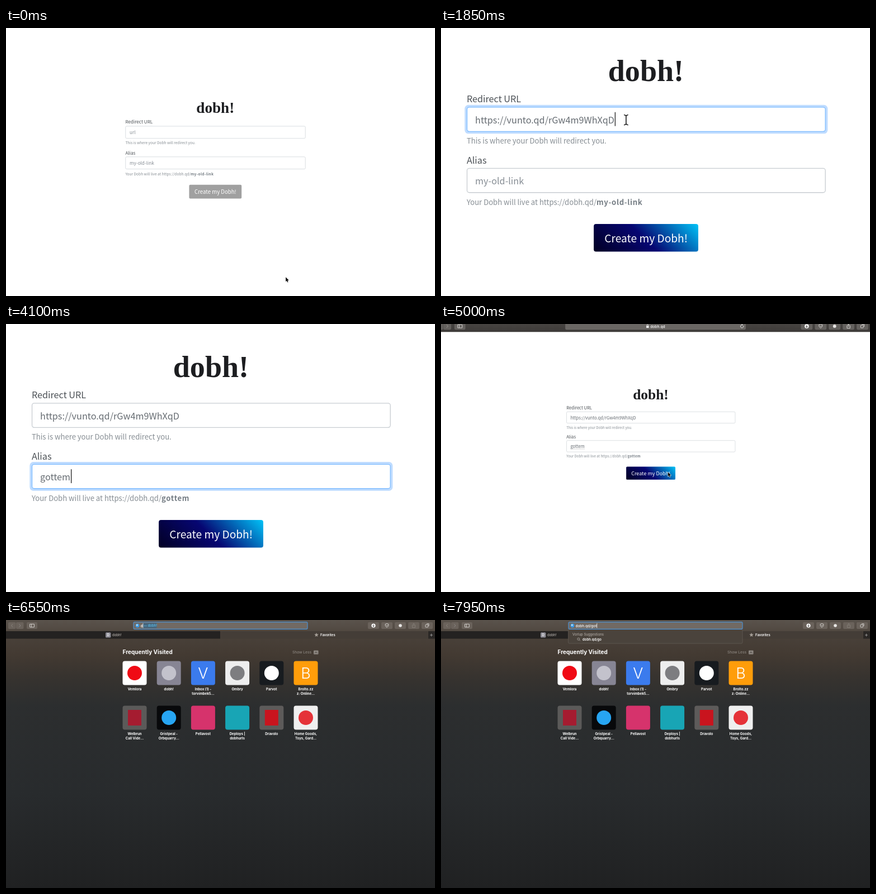
An HTML page with a canvas for the animation above (8000 ms loop, 767x480 px).

```html
<!DOCTYPE html>
<html lang="en">
<meta charset="utf-8">
<style>
  html, body { margin: 0; width: 100%; height: 100%; overflow: hidden; background: #fff; }
  canvas { display: block; }
</style>
<canvas id="stage" width="767" height="480"></canvas>
<script>
const ctx = document.getElementById('stage').getContext('2d');
const LOOP = 8000;
const PAGE = '"Noto Sans CJK JP", "Noto Sans CJK SC", "Noto Sans", sans-serif';
const UI = 'Inter, Roboto, sans-serif';
const SERIF = '"Liberation Serif", serif';
const LINK = 'https://vunto.qd/rGw4m9WhXqD', ALIAS = 'gottem', SITE = 'dobh.qd';

// [time, values...]
const CAMERA = [[1000, 1.107, -41.2, 1.3], [1550, 2.206, -461.5, -206], [4400, 2.206, -461.5, -206], [5150, 1, 0, 0]];
const POINTER = [[50, 489, 402], [850, 359.2, 168], [1900, 359.2, 168], [2450, 366.4, 223.5],
  [4400, 366.4, 223.5], [5000, 405, 262], [5300, 405, 262], [5800, 422, 272]];

const ease = p => p < .5 ? 4 * p ** 3 : 1 - (2 - 2 * p) ** 3 / 2;
const typed = (s, t, start, step) => s.slice(0, Math.max(0, Math.floor((t - start) / step) + 1));

function track(keys, t) {
  const i = keys.findIndex(k => k[0] > t);
  if (i === 0) return keys[0].slice(1);
  if (i < 0) return keys.at(-1).slice(1);
  const a = keys[i - 1], b = keys[i], p = ease((t - a[0]) / (b[0] - a[0]));
  return a.slice(1).map((v, n) => v + (b[n + 1] - v) * p);
}

function box(x, y, w, h, r, fill, stroke, width = .6) {
  ctx.beginPath();
  ctx.roundRect(x, y, w, h, r);
  if (fill) { ctx.fillStyle = fill; ctx.fill(); }
  if (stroke) { ctx.strokeStyle = stroke; ctx.lineWidth = width; ctx.stroke(); }
}

function dot(x, y, r, fill, stroke) {
  box(x - r, y - r, 2 * r, 2 * r, r, fill, stroke, .8);
}

function line(color, width, ...points) {
  ctx.beginPath();
  for (const [x, y] of points) ctx.lineTo(x, y);
  ctx.strokeStyle = color;
  ctx.lineWidth = width;
  ctx.stroke();
}

function star(x, y, r, n, inner, fill) {
  ctx.beginPath();
  for (let i = 0; i < 2 * n; i++) {
    const a = i * Math.PI / n - Math.PI / 2, d = i % 2 ? r * inner : r;
    ctx.lineTo(x + d * Math.cos(a), y + d * Math.sin(a));
  }
  ctx.fillStyle = fill;
  ctx.fill();
}

function fade(x0, y0, x1, y1, stops) {
  const g = ctx.createLinearGradient(x0, y0, x1, y1);
  for (const [at, color] of stops) g.addColorStop(at, color);
  return g;
}

// Draws text and returns its width.
function text(s, x, y, size, color, align = 'left', weight = 300, family = PAGE) {
  ctx.font = `${weight} ${size}px ${family}`;
  ctx.textAlign = align;
  ctx.fillStyle = color;
  ctx.fillText(s, x, y);
  return ctx.measureText(s).width;
}

// Interface text, centred vertically on y.
const ui = (s, x, y, color = '#fff', weight = 500, size = 6, align = 'left') =>
  text(s, x, y + size * .36, size, color, align, weight, UI);

function field(y, value, placeholder, focused) {
  if (focused) box(228.4, y - 1.6, 294.2, 23.4, 3, '#bfdcff');
  box(230.3, y + .3, 290.4, 19.7, 1.8, '#fff', focused ? '#80bdff' : '#c8cdd2');
  const w = text(value || placeholder, 236.9, y + 13.3, 7.35, value ? '#666c72' : '#868d94');
  if (focused) {
    const x = 237.2 + (value ? w + .4 : 0);
    line('#222', .6, [x, y + 4.3], [x, y + 15.6]);
  }
  return w;
}

function form(t) {
  const url = t >= 1500 ? LINK : '', alias = typed(ALIAS, t, 3000, 150);
  const focus = t < 1000 || t >= 5000 ? 0 : t < 2500 ? 1 : 2;
  text('dobh!', 375.3, 136.5, 24.5, '#1c1d20', 'center', 700, SERIF);
  text('Redirect URL', 230, 153.7, 7.35, '#4b5055');
  field(157.4, url, 'url', focus === 1);
  text('This is where your Dobh will redirect you.', 230, 187.1, 5.95, '#868d93');
  text('Alias', 230, 203.5, 7.35, '#4b5055');
  const w = field(207, alias, 'my-old-link', focus === 2);
  if (t >= 5000) {
    ctx.setLineDash([.8, .8]);
    line('#999', .7, [237, 222], [237 + w, 222]);
    ctx.setLineDash([]);
  }
  const lead = text(`Your Dobh will live at https://${SITE}/`, 230, 236.9, 5.95, '#868d93');
  ctx.letterSpacing = '.3px';
  text(alias || 'my-old-link', 230 + lead, 236.9, 5.95, '#757d84', 'left', 700);
  ctx.letterSpacing = '0px';
  box(333, 252.5, 84.7, 22.4, 1.8, url
    ? fade(348.7, 290.3, 402.3, 236.7, [[0, '#020024'], [.48, '#060672'], [1, '#00c4f8']])
    : '#a0a0a0');
  text('Create my Dobh!', 375.4, 267.5, 8.7, '#fff', 'center');
}

function alertBox() {
  box(230, 292, 291, 39.5, 2, '#cde9d4');
  text('Successfully created URL!', 363.5, 308.7, 9.1, '#4c5f53', 'center');
  const w = text(`http://${SITE}/${ALIAS}`, 363.5, 321, 7.4, '#1b7dff', 'center');
  for (const side of [-1, 1]) {
    const x = 363.5 + side * (w / 2 + 5);
    star(x, 318.5, 3.2, 4, .3, '#f3b63f');
    star(x - 2.7, 316, 1.4, 4, .3, '#f3b63f');
  }
  line('#5f7567', .8, [503.7, 302.7], [508.3, 307.3]);
  line('#5f7567', .8, [508.3, 302.7], [503.7, 307.3]);
}

function toolbar(right, button, dim) {
  const ink = '#e8e6e4', arrow = dim ? '#8a837d' : ink;
  box(4, 4, 13.5, 12, 2, button);
  box(18, 4, 13.5, 12, 2, button);
  line(arrow, 1, [12, 7.3], [9.5, 10], [12, 12.7]);
  line('#8a8683', 1, [23.5, 7.3], [26, 10], [23.5, 12.7]);
  box(37, 4, 19, 12, 2, button);
  box(42.5, 7.3, 8, 5.6, .5, null, ink, .8);
  line(ink, .8, [45.3, 7.3], [45.3, 12.9]);
  for (let i = 0; i < 5; i++) box(right - 10 + 24 * i, 4, 20, 12, 2, button);
  dot(right, 10, 3.6, '#fff');
  line('#4a4744', 1, [right, 8], [right, 12]);
  line('#4a4744', 1, [right - 1.6, 10.4], [right, 12], [right + 1.6, 10.4]);
  const s = right + 24;
  line(ink, .8, [s, 6.4], [s + 3, 7.5], [s + 2.6, 10.8], [s, 13.4], [s - 2.6, 10.8], [s - 3, 7.5], [s, 6.4]);
  line(ink, .8, [s - 1.2, 9.7], [s, 10.8], [s + 1.4, 9]);
  dot(s + 24, 10, 2.8, ink);
  const u = s + 48, share = dim ? '#8a837d' : ink;
  line(share, .8, [u - 1.4, 9], [u - 2.6, 9], [u - 2.6, 13.5], [u + 2.6, 13.5], [u + 2.6, 9], [u + 1.4, 9]);
  line(share, .8, [u, 11], [u, 6.3]);
  line(share, .8, [u - 1.5, 7.7], [u, 6.2], [u + 1.5, 7.7]);
  box(s + 69, 8.3, 4.6, 4.6, .6, null, ink, .8);
  line(ink, .8, [s + 71, 6.7], [s + 75, 6.7], [s + 75, 11]);
}

function plus(x, y, color) {
  line(color, .8, [x - 2.5, y], [x + 2.5, y]);
  line(color, .8, [x, y - 2.5], [x, y + 2.5]);
}

function lightChrome() {
  box(0, 0, 767, 20, 0, fade(0, 0, 0, 20, [[0, '#4b4845'], [1, '#3d3a38']]));
  toolbar(644, '#64615e', false);
  box(228, 4, 311, 12, 2, '#6a6764');
  box(367.6, 9.4, 4.4, 3.6, .6, '#eee');
  box(368.5, 7.2, 2.6, 4, 1.3, null, '#eee', .8);
  ui(SITE, 374.5, 10.2, '#fff', 500, 6.4);
  ctx.beginPath();
  ctx.arc(532.5, 10.2, 2.7, -.4, 5);
  ctx.strokeStyle = '#eee';
  ctx.lineWidth = .8;
  ctx.stroke();
  line('#eee', .8, [532, 6.2], [533.6, 7.6], [532, 9]);
  box(754, 8, 13, 12, 0, '#2b2927');
  plus(760.5, 14, '#aaa');
}

// label lines, tile colour, mark shape, mark colour or letter
const TILES = [
  [['Vemlora'], '#fff', 'circle', '#f00a14'],
  [['dobh!'], '#878594', 'circle', '#c3c2cc'],
  [['Inbox (1) -', 'torvimbek5...'], '#3b7bed', 'letter', 'V'],
  [['Ombry'], '#eeeeee', 'circle', '#7d7d80'],
  [['Parvot'], '#171b1f', 'circle', '#fff'],
  [['Brolto.zz', 'z: Online...'], '#ff9d0a', 'letter', 'B'],
  [['Welbrun', 'Call Vide...'], '#5b5a59', 'square', '#a51c30'],
  [['Gristpeal -', 'Orbquarry...'], '#08090b', 'circle', '#27a5f2'],
  [['Pellavost'], '#d6336c'],
  [['Deploys |', 'dobhurls'], '#18a5b5'],
  [['Dravolo'], '#5d5b5a', 'square', '#c9141e'],
  [['Home Goods,', 'Toys, Gard...'], '#efefef', 'circle', '#e53238'],
];
const tileAt = i => [230 + 61.2 * (i % 6), i < 6 ? 95 : 175];

function favorites() {
  box(0, 0, 767, 480, 0, fade(0, 0, 0, 480,
    [[0, '#574f48'], [.05, '#4a423b'], [.13, '#433a32'], [.21, '#37332f'], [.32, '#2c2e2f'], [.65, '#282b2d'], [1, '#202122']]));
  ui('Frequently Visited', 208.5, 57.3, '#fff', 700, 10);
  ui('Show Less', 546, 58, '#8b857f', 500, 6.6, 'right');
  box(550, 54.5, 8.5, 7, 1, '#8b857f');
  line('#3d3731', 1, [552.3, 59.2], [554.2, 57], [556.2, 59.2]);
  TILES.forEach(([label, color, shape, mark], i) => {
    const [x, y] = tileAt(i);
    box(x - 21.5, y - 21.5, 43, 43, 4, color);
    if (shape === 'circle') dot(x, y, 13, mark);
    if (shape === 'square') box(x - 12, y - 14, 24, 28, 0, mark);
    if (shape === 'letter') ui(mark, x, y + .5, '#fff', 300, 27, 'center');
    label.forEach((s, n) => ui(s, x, y + 29 + 8 * n, '#fff', 700, 6.1, 'center'));
  });
}

function darkChrome() {
  box(0, 0, 767, 20, 0, fade(0, 0, 0, 20, [[0, '#5a534c'], [1, '#514941']]));
  toolbar(657, '#6a625b', true);
  box(0, 20, 383, 13.5, 0, '#242221');
  box(383.5, 20, 371, 13.5, 0, '#443d37');
  box(755, 20, 12, 13.5, 0, '#2a2725');
  plus(760.5, 27, '#aaa');
  box(178, 22.2, 9.4, 9.4, 1.6, '#8d8c95');
  ui('D', 182.7, 27, '#fff', 600, 6, 'center');
  ui('dobh!', 190, 27, '#b5b0ab');
  star(555, 26.8, 4, 5, .45, '#a49d96');
  ui('Favorites', 562, 27, '#fff', 600);
}

function globe(x, y) {
  dot(x, y, 3.4, '#3d9be6');
  box(x - 2, y - 2.2, 2.6, 2.8, 1, '#cfe9f5');
}

function lens(y) {
  dot(245.8, y - .6, 2, null, '#b5b0ab');
  line('#b5b0ab', .8, [247.3, y + .9], [249, y + 2.6]);
}

function hit(name, address, y, color = '#c5c0bb') {
  globe(247, y);
  const w = ui(name, 253, y, '#fff', 600);
  ui(` — ${address}`, 253 + w, y, color);
}

const panelTitle = (s, y) => ui(s, 235, y, '#aca6a0');
const rule = y => line('#7b756f', .6, [228, y], [539, y]);

const SUGGESTIONS = ['dobh.q', 'dobh.gif', 'dobh goose', 'bold gong', 'dobh goose meme', 'dobh game'];
const HISTORY = [
  ["drobbling-web | Drobbling's web dashboard and competition...", SITE + '/.paxolit/functions/serv...'],
  ['Vorlup', SITE + '/qpwofj[hsk;re'],
  ['TarnBoxes - Vemlora', SITE + '/tarnix'],
  ['Tezzik | Welcome to your new app!', SITE + '/mwopqez'],
  [`${SITE}/README.md at master · tarnix/${SITE}`, `parvot.zzz/tarnix/${SITE}/bl...`],
  ['Cannot Open Page', 'dobh.qx'],
  ['Tob Varnley - Seven Paper Boats Adrift (Video) - Vemlora', SITE + '/hum'],
];

function fullPanel() {
  ctx.save();
  box(227.5, 17, 311.5, 232, 2, fade(0, 17, 0, 249, [[0, '#4d463f'], [.4, '#413c37'], [1, '#343534']]), '#68625c', .6);
  ctx.clip();
  ctx.globalAlpha = .38;
  for (const [i, color] of [[2, '#3b7bed'], [5, '#ff9d0a'], [8, '#b03048'], [9, '#18a5b5'], [10, '#8c2026'], [3, '#77736f']]) {
    const [x, y] = tileAt(i), g = ctx.createRadialGradient(x, y, 4, x, y, 36);
    g.addColorStop(0, color);
    g.addColorStop(1, color + '00');
    box(x - 36, y - 36, 72, 72, 0, g);
  }
  ctx.restore();
  panelTitle('Top Hits', 25.5);
  box(228, 30, 311, 11, 0, '#0b5ad6');
  hit('dobh!', SITE, 35.5, '#e4edfc');
  hit('Error', SITE + '/.paxolit/functions/server/', 46);
  rule(53.5);
  panelTitle('Switch to Tab', 62);
  hit('dobh!', SITE, 72);
  rule(81);
  panelTitle('Vorlup Suggestions', 88.5);
  SUGGESTIONS.forEach((s, i) => {
    const y = 98 + 10.65 * i;
    lens(y);
    ui(s, 253, y, '#fff', 600);
  });
  rule(160.5);
  panelTitle('Bookmarks and History', 168);
  HISTORY.forEach(([title, address], i) => {
    const y = 177.3 + 10.65 * i;
    ui(title, 242, y, '#fff', 600);
    ui(address, 442, y, '#b0aba6');
  });
}

function smallPanel(query) {
  box(227.5, 17, 311.5, 25, 2, '#4a433c', '#68625c', .6);
  panelTitle('Vorlup Suggestions', 25.5);
  lens(34.7);
  ui(query, 253, 34.7, '#fff', 600);
}

function newTab(t) {
  const query = typed(SITE + '/', t, 6500, 55) + typed('got', t, 7400, 220);
  favorites();
  darkChrome();
  if (t >= 7450) smallPanel(typed(SITE + '/go', t, 7450 - 8 * 220, 220));
  else if (t >= 6600) fullPanel();
  box(228, 3.7, 311, 12.6, 2, '#716a64', '#4b8fd0', 1.2);
  if (query) globe(235, 10);
  const x = 240.5 + ui(query, 240.5, 10.2, '#fff', 500, 6.4);
  if (query && t < 7400) {
    box(x, 5.5, 25, 9, 0, '#456780');
    ui(' — dobh!', x, 10.2, '#62c0e6', 500, 6);
  }
  line('#fff', .7, [x + .5, 5.7], [x + .5, 14.3]);
}

function pointer(t) {
  if (t >= 3000 && t < 4400) return;
  const [x, y] = track(POINTER, t);
  const overField = x > 230 && x < 521 && (y > 157 && y < 178 || y > 207 && y < 227);
  if (overField) {
    for (const [color, w] of [['#fff', 1.6], ['#111', .7]]) {
      line(color, w, [x, y - 3.6], [x, y + 3.6]);
      for (const s of [-1, 1]) line(color, w, [x - 1.7, y + 4.2 * s], [x, y + 3.5 * s], [x + 1.7, y + 4.2 * s]);
    }
    return;
  }
  ctx.beginPath();
  for (const [dx, dy] of [[0, 0], [0, 7.2], [1.6, 5.7], [2.8, 8.4], [4, 7.9], [2.9, 5.3], [5.1, 5.2]]) ctx.lineTo(x + dx, y + dy);
  ctx.closePath();
  ctx.strokeStyle = '#fff';
  ctx.lineWidth = 1;
  ctx.stroke();
  ctx.fillStyle = '#000';
  ctx.fill();
}

function draw(now) {
  const t = now % LOOP;
  ctx.setTransform(1, 0, 0, 1, 0, 0);
  ctx.fillStyle = '#fff';
  ctx.fillRect(0, 0, 767, 480);
  if (t >= 6350) {
    newTab(t);
  } else {
    const [zoom, x, y] = track(CAMERA, t);
    ctx.setTransform(zoom, 0, 0, zoom, x, y);
    form(t);
    if (t >= 5450) alertBox();
    if (t >= 3000) lightChrome();
    pointer(t);
  }
  requestAnimationFrame(draw);
}
requestAnimationFrame(draw);
</script>
</html>
```
